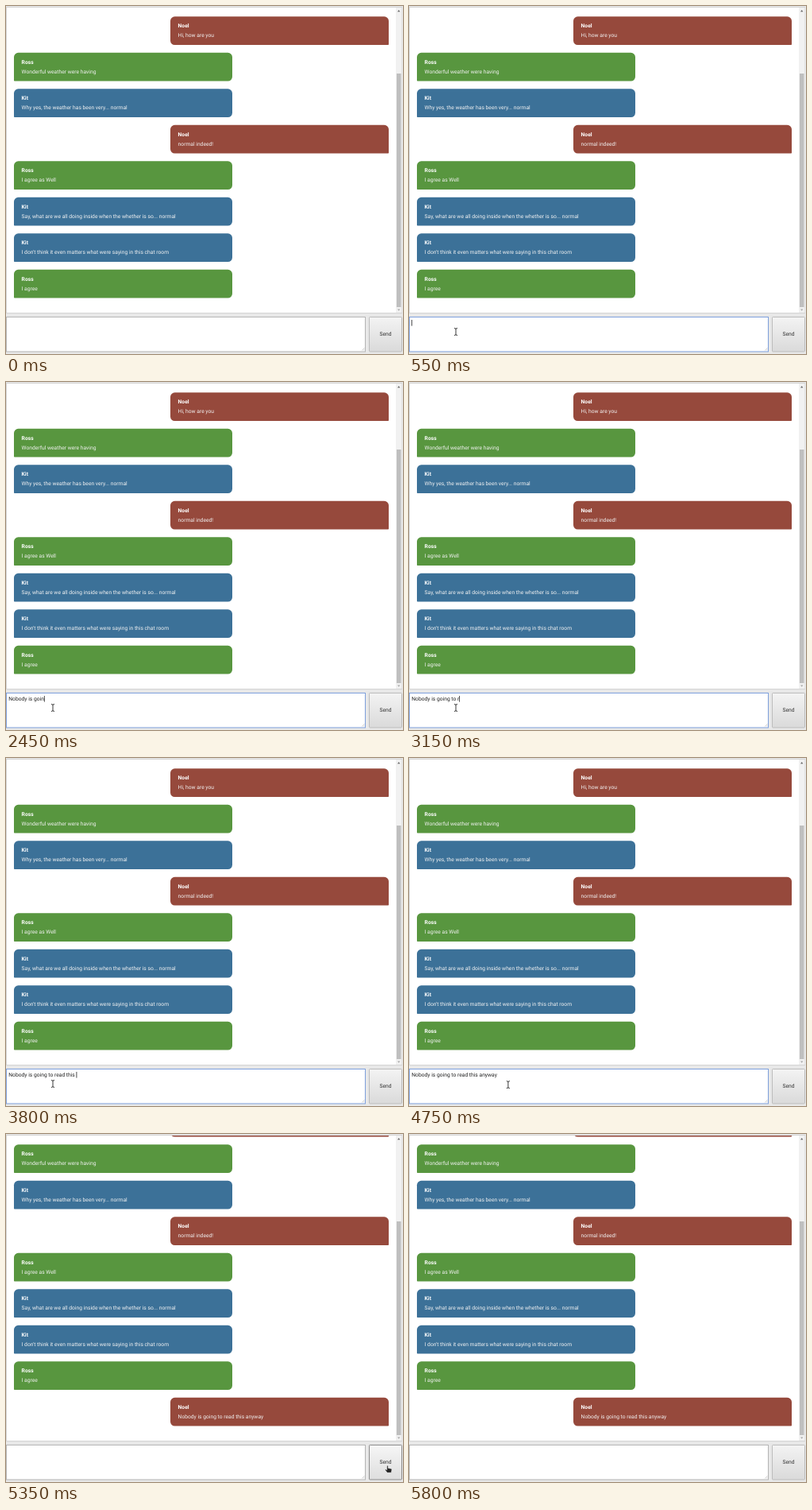
Animation of 500 by 438 pixels, one loop 6.55 s. Source, as an HTML page:

```html
<!DOCTYPE html>
<html lang="en">
<head>
<meta charset="utf-8">
<title>Chat room</title>
<style>
  html, body { margin: 0; width: 100%; height: 100%; overflow: hidden; background: #e8e8e8; }
  svg { display: block; width: 500px; height: 438px; }
  text {
    font: 6.72px Roboto, Arial, sans-serif;
    text-rendering: geometricPrecision;
    white-space: pre;
  }
  .msg text { fill: #f2f2f2; }
  .msg .name { font-weight: 700; fill: #fff; }
  #field { fill: #fff; stroke: #b4b4b4; }
  #field.focus { stroke: #7d9fdc; }
  #send { stroke: #bcbcbc; fill: url(#face); }
  #send.hover { stroke: #8c8c8c; fill: url(#lit); }
</style>
</head>
<body>
<svg viewBox="0 0 500 438">
  <defs>
    <clipPath id="view"><rect x="1" y="2" width="490" height="384"/></clipPath>
    <linearGradient id="face" x2="0" y2="1">
      <stop stop-color="#f3f3f3"/><stop offset="1" stop-color="#dadada"/>
    </linearGradient>
    <linearGradient id="lit" x2="0" y2="1">
      <stop stop-color="#f6f6f6"/><stop offset="1" stop-color="#dedede"/>
    </linearGradient>
  </defs>

  <rect width="500" height="438" fill="#e8e8e8"/>
  <rect x=".5" y="1.5" width="498" height="385" fill="#fff" stroke="#d4d4d4"/>
  <g clip-path="url(#view)"><g id="list"></g></g>

  <rect x="491" y="2" width="7.5" height="384" fill="#f1f1f1"/>
  <rect id="thumb" x="492" width="5.5" fill="#bfbfbf"/>
  <path d="M493 7.2l1.7-2.2 1.7 2.2z" fill="#666"/>
  <path d="M493 381.5l1.7 2.2 1.7-2.2z" fill="#aaa"/>

  <rect id="field" x=".5" y="391.5" width="452" height="43.5"/>
  <path d="M448.5 433.5l3-3M450.5 433.5l1-1" stroke="#999" stroke-width=".5"/>
  <text id="input" x="3.3" y="401" fill="#222"></text>
  <rect id="caret" y="395" width=".8" height="7.6" fill="#222"/>

  <rect id="send" x="457.5" y="391.5" width="41" height="43.5" rx=".8"/>
  <text x="478" y="415.4" text-anchor="middle" fill="#333">Send</text>

  <g id="pointer">
    <path id="beam" d="M-2-4.5Q0-4.5 0-3.3Q0-4.5 2-4.5M0-3.5V3.5M-2 4.5Q0 4.5 0 3.3Q0 4.5 2 4.5"
      fill="none" stroke="#222" stroke-width=".9"/>
    <path id="arrow" d="M0 0V8L1.9 6.3 3.1 9 4.3 8.5 3.1 5.8H5.6z" fill="#222" stroke="#fff" stroke-width=".5"/>
    <path id="hand" d="M-.8.6Q0-.6.8.6V3.2L4.6 4Q5.6 4.3 5.4 5.4L4.7 9H-.3L-2.9 5.8Q-3.1 4.4-1.9 4.8L-.8 5.7z"
      fill="#222" stroke="#fff" stroke-width=".5"/>
  </g>
</svg>
<script>
const LOOP = 6550, STEP = 50, PITCH = 45.5, BLINK = 300;
const FOCUS = 550, BLUR = 5200, CLEAR = 5250, POST = 5350;
const DRAFT = 'Nobody is going to read this anyway';

const people = {
  me: { name: 'Noel', color: '#96493c', x: 207 },
  a: { name: 'Ross', color: '#58963f', x: 10 },
  b: { name: 'Kit', color: '#3c7198', x: 10 }
};
const messages = [
  ['me', 'Hi, how are you'],
  ['a', 'Wonderful weather were having'],
  ['b', 'Why yes, the weather has been very... normal'],
  ['me', 'normal indeed!'],
  ['a', 'I agree as Well'],
  ['b', 'Say, what are we all doing inside when the whether is so... normal'],
  ['b', "I don't think it even matters what were saying in this chat room"],
  ['a', 'I agree'],
  ['me', DRAFT]
];

// One time per typed character.
const keys = [
  850, 950, 1150, 1300, 1750, 1800, 1900, 1950, 2050, 2150, 2200, 2300, 2350,
  2450, 2550, 2650, 2800, 2900, 3000,
  3150, 3200, 3300, 3350, 3450, 3500, 3600, 3650, 3700, 3800,
  3900, 4000, 4100, 4200, 4300, 4400
];

// Pointer path: time, x, y.
const path = [
  [0, 90, 442], [50, 86, 430], [500, 59, 410], [4650, 59, 410],
  [5050, 480.5, 417.3], [5400, 480.5, 417.3], [5750, 476, 442]
];

const $ = id => document.getElementById(id);
const show = (el, on) => el.setAttribute('visibility', on ? 'visible' : 'hidden');

function add(parent, tag, attrs, text = '') {
  const el = document.createElementNS('http://www.w3.org/2000/svg', tag);
  for (const k in attrs) el.setAttribute(k, attrs[k]);
  el.textContent = text;
  return parent.appendChild(el);
}

// Rounded box whose bottom outer corner is nearly square.
function bubble(x, y, mine) {
  const w = 275, h = 35.8, r = 5.5, s = 0.8;
  const br = mine ? s : r, bl = mine ? r : s;
  return `M${x + r} ${y}h${w - 2 * r}a${r} ${r} 0 0 1 ${r} ${r}v${h - r - br}` +
    `a${br} ${br} 0 0 1 ${-br} ${br}h${br + bl - w}a${bl} ${bl} 0 0 1 ${-bl} ${-bl}` +
    `v${r + bl - h}a${r} ${r} 0 0 1 ${r} ${-r}z`;
}

const rows = messages.map(([who, text], i) => {
  const { name, color, x } = people[who], y = 13.3 + i * PITCH;
  const g = add($('list'), 'g', { class: 'msg' });
  add(g, 'path', { d: bubble(x, y, who === 'me'), fill: color });
  add(g, 'text', { x: x + 9.6, y: y + 14.1, class: 'name' }, name);
  add(g, 'text', { x: x + 9.6, y: y + 25.9 }, text);
  return g;
});

function pointerAt(t) {
  const i = path.findIndex(p => p[0] > t);
  if (i < 1) return path[path.length - 1].slice(1);
  const [t0, x0, y0] = path[i - 1], [t1, x1, y1] = path[i];
  const u = (t - t0) / (t1 - t0), e = u * u * (3 - 2 * u);
  return [x0 + (x1 - x0) * e, y0 + (y1 - y0) * e];
}

function drawPointer(t) {
  const [x, y] = pointerAt(t);
  const inside = y > 391 && y < 435;
  const overField = inside && x < 453, overSend = inside && x > 457;
  $('pointer').setAttribute('transform', `translate(${x} ${y})`);
  show($('beam'), overField);
  show($('hand'), overSend);
  show($('arrow'), !overField && !overSend);
  $('send').classList.toggle('hover', overSend);
}

function drawInput(t) {
  const count = t < CLEAR ? keys.filter(k => k <= t).length : 0;
  const focused = t >= FOCUS && t < BLUR;
  const last = count ? keys[count - 1] : FOCUS;
  const input = $('input');
  input.textContent = DRAFT.slice(0, count);
  $('field').classList.toggle('focus', focused);
  $('caret').setAttribute('x', 3.3 + (count ? input.getComputedTextLength() : 0));
  show($('caret'), focused && Math.floor((t - last) / BLINK) % 2 === 0);
}

function drawList(t) {
  const posted = t >= POST, top = posted ? 110 : 85;
  show(rows[rows.length - 1], posted);
  $('list').setAttribute('transform', `translate(0 ${posted ? -PITCH : 0})`);
  $('thumb').setAttribute('y', top);
  $('thumb').setAttribute('height', 379 - top);
}

const start = performance.now();
function draw(now) {
  const t = Math.floor(Math.max(0, now - start) % LOOP / STEP) * STEP;
  drawPointer(t);
  drawInput(t);
  drawList(t);
  requestAnimationFrame(draw);
}
draw(start);
</script>
</body>
</html>
```
